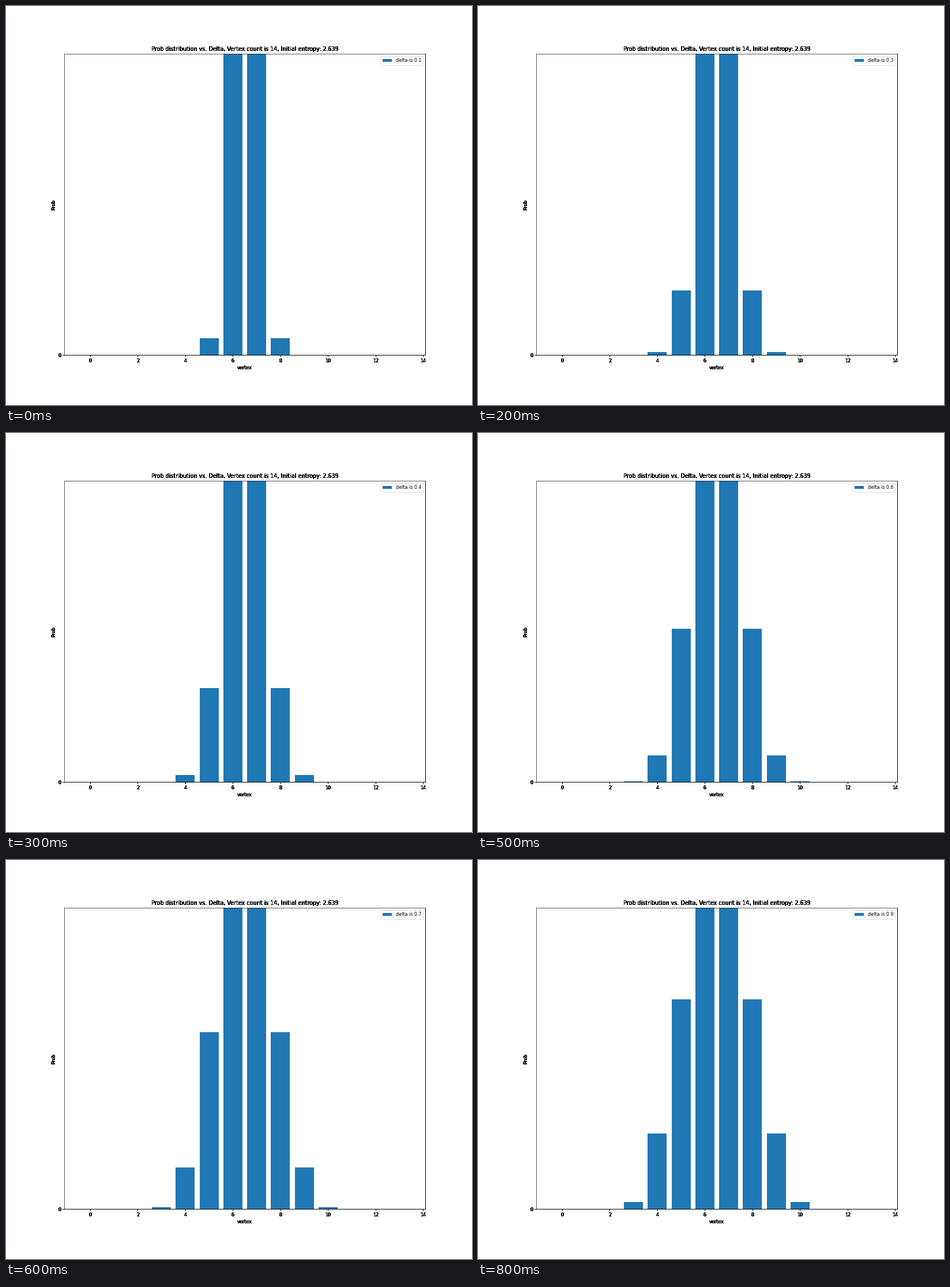
These frames come from a looping animation (808x693 px, 900 ms). A matplotlib script:

```python
import matplotlib.pyplot as plt
from matplotlib.animation import FuncAnimation

W, H, DPI = 808, 693, 64
BOX = [0.125, 0.125, 0.775, 0.755]
TOP = H * BOX[3]          # plot height in pixels, used as the y scale
BLUE = "#1f77b4"
STEPS = 9
LAYERS = 9                # stacked axes make the outer text heavy

# bar heights for delta 0.1 ... 0.9, by distance from the centre pair
NEAR = [29.5, 67.5, 112, 163.5, 217, 266, 307, 340, 364]
MID = [0, 1.1, 4.9, 12.8, 26.4, 46.4, 72.2, 101, 131.4]

plt.rcParams.update({
    "font.family": "DejaVu Sans",
    "font.size": 9,
    "axes.linewidth": 0.72,
    "axes.titlepad": 5.4,
    "axes.labelpad": 3.6,
    "xtick.major.size": 3.15,
    "ytick.major.size": 3.15,
    "xtick.major.pad": 3.15,
    "ytick.major.pad": 3.15,
    "xtick.major.width": 0.72,
    "ytick.major.width": 0.72,
    "patch.linewidth": 0.9,
})


def add_plot(fig):
    ax = fig.add_axes(BOX)
    ax.set_xlim(-1.09, 14.09)
    ax.set_ylim(0, TOP)
    ax.set_xticks(range(0, 15, 2))
    ax.set_yticks([0])
    ax.set_xlabel("vertex")
    ax.set_ylabel("Prob")
    ax.set_title("Prob distribution vs. Delta, Vertex count is 14, "
                 "Initial entropy: 2.639")
    return ax


def heights(step):
    delta = (step + 1) / 10
    half = [0, 0, 0, 21.3 * delta ** 5, MID[step], NEAR[step], 2 * TOP]
    return half + half[::-1]


fig = plt.figure(figsize=(W / DPI, H / DPI), dpi=DPI, facecolor="white")
for _ in range(LAYERS):
    ax = add_plot(fig)

bars = ax.bar(range(14), heights(0), width=0.8, color=BLUE,
              label="delta is 0.1")
label = ax.legend(loc="upper right").get_texts()[0]


def draw(step):
    for bar, h in zip(bars, heights(step)):
        bar.set_height(h)
    label.set_text(f"delta is {(step + 1) / 10:.1f}")
    return [*bars, label]


anim = FuncAnimation(fig, draw, frames=STEPS, interval=100,
                     init_func=lambda: draw(0), repeat=True, repeat_delay=0)
plt.show()
```
